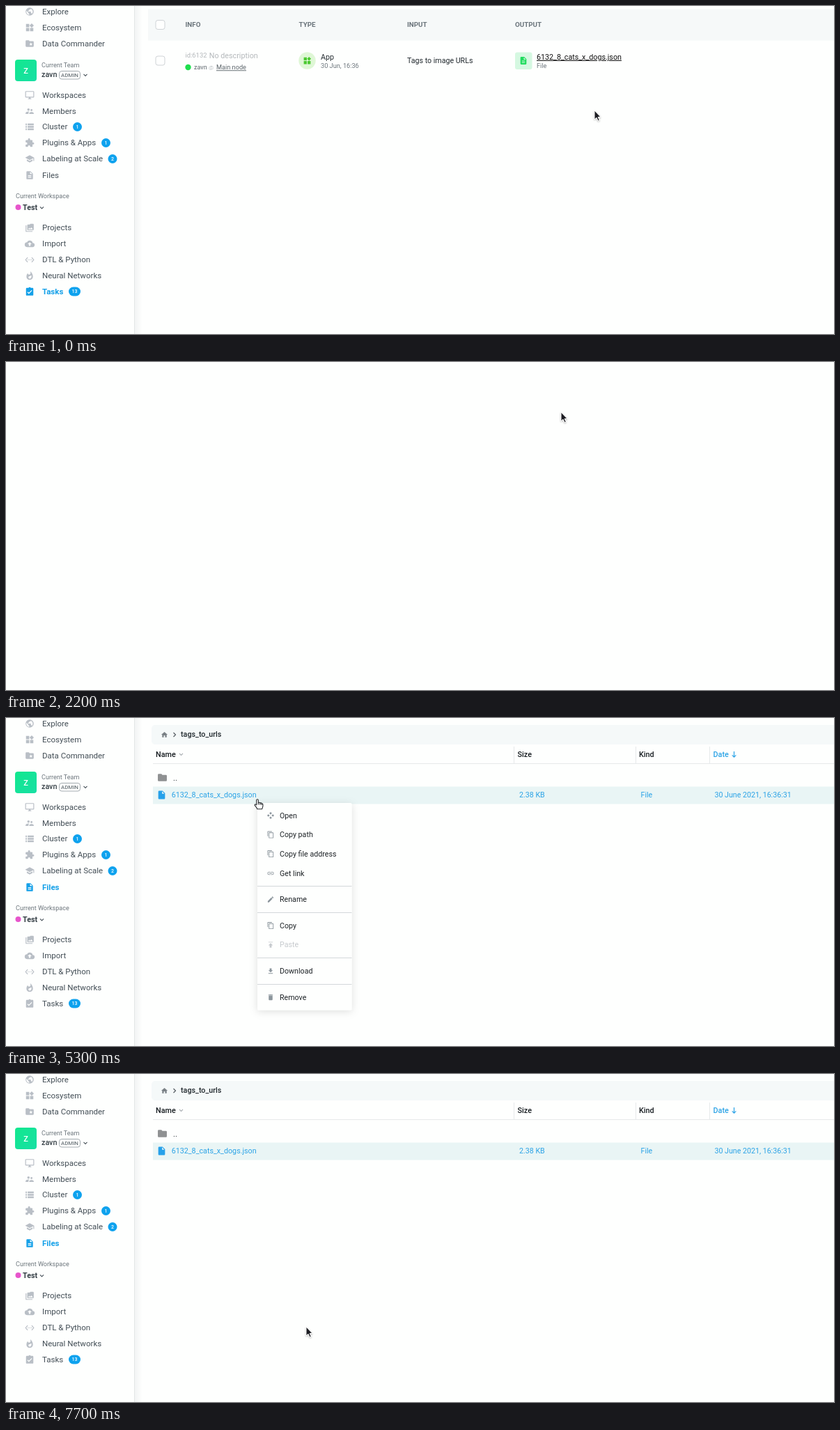
Recreate the animation shown at these times as an HTML page. Size 1189 by 471 pixels, loop 8900 ms.

```html
<!DOCTYPE html>
<html lang="en">
<head>
<meta charset="utf-8">
<title>Finding a task output file</title>
<style>
html, body { margin: 0; width: 100%; height: 100%; overflow: hidden; background: #fefffe; }
svg { display: block; width: 100vw; height: 100vh; font-family: Roboto, sans-serif; }
.item text { fill: #434e56; }
.item .icon { fill: #b9bfc6; }
.item.on text { fill: #14a0e8; font-weight: 700; }
.item.on .icon { fill: #14a0e8; }
.item .badge text { fill: #fff; font-weight: 500; }
.row { fill: #5d6872; }
.row .name { fill: #10181d; }
.row.picked, .row.picked .name { fill: #2ba3e6; }
.entry .icon { fill: #8b959c; }
.entry text { fill: #1d2226; }
.entry.off text, .entry.off .icon { fill: #c6cace; }
.entry .back { fill: none; }
.entry.on .back { fill: #e2e6ef; }
.entry.on .icon { fill: #23282d; }
</style>
</head>
<body>
<svg id="stage" viewBox="0 0 1189 471" preserveAspectRatio="none"></svg>
<script>
const LOOP = 8900, STEP = 100;

const ICONS = {
  globe: 'M12 2a10 10 0 1 0 0 20 10 10 0 0 0 0-20zM11 20a8 8 0 0 1-7-10l5 5v1l2 2zM18 17l-2-1h-1v-4H8v-2h2l1-3h2l2-2a8 8 0 0 1 3 12z',
  widgets: 'M3 3h8v8H3zM3 13h8v8H3zM13 13h8v8h-8zM17 1.7 22.3 7 17 12.3 11.7 7z',
  starFolder: 'M10 4H4a2 2 0 0 0-2 2v12a2 2 0 0 0 2 2h16a2 2 0 0 0 2-2V8a2 2 0 0 0-2-2h-8zM15 9l1.2 3H19l-2.2 2 .8 3-2.6-1.6-2.6 1.6.8-3-2.2-2h2.8z',
  folder: 'M10 4H4a2 2 0 0 0-2 2v12a2 2 0 0 0 2 2h16a2 2 0 0 0 2-2V8a2 2 0 0 0-2-2h-8z',
  screen: 'M21 2H3a2 2 0 0 0-2 2v12a2 2 0 0 0 2 2h7v2H8v2h8v-2h-2v-2h7a2 2 0 0 0 2-2V4a2 2 0 0 0-2-2zM21 16H3V4h18z',
  people: 'M16.5 7a2.5 2.5 0 1 0 0 5 2.5 2.5 0 0 0 0-5zM9 5a3 3 0 1 0 0 6 3 3 0 0 0 0-6zM16.5 14c-1.8 0-5.5.9-5.5 2.7V19h11v-2.3c0-1.8-3.7-2.7-5.5-2.7zM9 13c-2.3 0-7 1.2-7 3.5V19h7v-2.3c0-.8.3-2.3 2.4-3.4z',
  list: 'M2 4h3v4H2zM7 4h15v4H7zM2 10h3v4H2zM7 10h15v4H7zM2 16h3v4H2zM7 16h15v4H7z',
  puzzle: 'M20.5 11H19V7a2 2 0 0 0-2-2h-4V3.5a2.5 2.5 0 0 0-5 0V5H4a2 2 0 0 0-2 2v3.8h1.5a2.7 2.7 0 0 1 0 5.4H2V20a2 2 0 0 0 2 2h3.8v-1.5a2.7 2.7 0 0 1 5.4 0V22H17a2 2 0 0 0 2-2v-4h1.5a2.5 2.5 0 0 0 0-5z',
  school: 'M5 13.2v4L12 21l7-3.8v-4L12 17zM12 3 1 9l11 6 9-4.9V17h2V9z',
  doc: 'M14 2H6a2 2 0 0 0-2 2v16a2 2 0 0 0 2 2h12a2 2 0 0 0 2-2V8zM16 18H8v-2h8zM16 14H8v-2h8zM13 9V3.5L18.5 9z',
  file: 'M14 2H6a2 2 0 0 0-2 2v16a2 2 0 0 0 2 2h12a2 2 0 0 0 2-2V8zM13 9V3.5L18.5 9z',
  photos: 'M22 16V4a2 2 0 0 0-2-2h-6l-2 2H8a2 2 0 0 0-2 2v10a2 2 0 0 0 2 2h12a2 2 0 0 0 2-2zM8 16l3-4 2 2.7 3-3.7 4 5zM2 6v14a2 2 0 0 0 2 2h15v-2H4V6z',
  cloud: 'M19.4 10A7.5 7.5 0 0 0 5.4 8 6 6 0 0 0 6 20h13a5 5 0 0 0 .4-10zM14 13v4h-4v-4H7l5-5 5 5z',
  arrows: 'M7.8 6.8 6.2 5.5.8 12l5.4 6.5 1.6-1.3L3.4 12zM7 11h2v2H7zM11 11h2v2h-2zM15 11h2v2h-2zM17.8 5.5l-1.6 1.3 4.4 5.2-4.4 5.2 1.6 1.3 5.4-6.5z',
  flame: 'M13.5.7s.7 2.6.7 4.8a3.5 3.5 0 0 1-7 0v-.4A14 14 0 0 0 4 14a8 8 0 0 0 16 0C20 8.600 17.400 3.800 13.500.7zM11.700 19a3.200 3.200 0 0 1-.4-6.300c1.800-.4 3.600-1.200 4.600-2.500 1.700 5.300-1.100 8.800-4.200 8.800z',
  task: 'M19 3h-4.200a3 3 0 0 0-5.600 0H5a2 2 0 0 0-2 2v15a2 2 0 0 0 2 2h14a2 2 0 0 0 2-2V5a2 2 0 0 0-2-2zM10 18l-4-4 1.400-1.400 2.600 2.600 6.600-6.600L18 10z',
  home: 'M10 20v-6h4v6h5v-8h3L12 3 2 12h3v8z',
  move: 'M12 1l4 4-4 4-4-4zM12 15l4 4-4 4-4-4zM5 8l4 4-4 4-4-4zM19 8l4 4-4 4-4-4z',
  copy: 'M16 1H4a2 2 0 0 0-2 2v14h2V3h12zM19 5H8a2 2 0 0 0-2 2v14a2 2 0 0 0 2 2h11a2 2 0 0 0 2-2V7a2 2 0 0 0-2-2zM19 21H8V7h11z',
  link: 'M3.900 12A3.100 3.100 0 0 1 7 8.900h4V7H7a5 5 0 0 0 0 10h4v-1.900H7A3.100 3.100 0 0 1 3.900 12zM8 11h8v2H8zM17 7h-4v1.900h4a3.100 3.100 0 0 1 0 6.200h-4V17h4a5 5 0 0 0 0-10z',
  pencil: 'M3 17.200V21h3.800L17.800 9.900l-3.700-3.700zM20.700 7a1 1 0 0 0 0-1.400l-2.300-2.300a1 1 0 0 0-1.400 0l-1.900 1.800 3.800 3.800z',
  paste: 'M5 3v2h14V3zM5 14h4v7h6v-7h4l-7-7z',
  download: 'M19 9h-4V3H9v6H5l7 7zM5 18v2h14v-2z',
  bin: 'M6 19a2 2 0 0 0 2 2h8a2 2 0 0 0 2-2V7H6zM19 4h-3.500l-1-1h-5l-1 1H5v2h14z'
};

const icon = (name, x, y, size, fill = '') =>
  `<path class="icon" d="${ICONS[name]}" fill-rule="evenodd" ${fill && `fill="${fill}"`}
    transform="translate(${x - size / 2} ${y - size / 2}) scale(${size / 24})"/>`;
// y is the middle of the capital letters
const text = (s, x, y, size, attrs = '') =>
  `<text x="${x}" y="${y + size * 0.355}" font-size="${size}" ${attrs}>${s}</text>`;
const rect = (x, y, w, h, fill, attrs = '') =>
  `<rect x="${x}" y="${y}" width="${w}" height="${h}" fill="${fill}" ${attrs}/>`;
const line = (d, color, w = 1) =>
  `<path d="${d}" fill="none" stroke="${color}" stroke-width="${w}"/>`;
const caret = (x, y, color) => line(`M${x - 2.500} ${y - 1.200}l2.500 2.500 2.500-2.500`, color, 1.200);
const group = (id, body) => `<g id="${id}">${body}</g>`;
const medium = 'font-weight="500"', bold = 'font-weight="700"', middle = 'text-anchor="middle"';

// label, icon, y, badge text, badge x
const NAV = [
  ['Explore', 'globe', 7.500], ['Ecosystem', 'widgets', 30.500], ['Data Commander', 'starFolder', 53.500],
  ['Workspaces', 'screen', 127.500], ['Members', 'people', 150.500], ['Cluster', 'list', 173, 1, 102.500],
  ['Plugins &amp; Apps', 'puzzle', 196, 1, 143.500], ['Labeling at Scale', 'school', 219, 2, 153],
  ['Files', 'doc', 242.500], ['Projects', 'photos', 318], ['Import', 'cloud', 341],
  ['DTL &amp; Python', 'arrows', 364], ['Neural Networks', 'flame', 387], ['Tasks', 'task', 409.500, 13, 98.500]
];

const badge = (n, x, y) => {
  const w = n > 9 ? 17 : 13;
  return `<g class="badge">${rect(x - w / 2, y - 6, w, 13, '#0ea2ee', 'rx="6.500"')}
    ${text(n, x, y + 0.500, 7, middle)}</g>`;
};

const sidebar =
  rect(185, 0, 11, 471, 'url(#edge)') + line('M184.500 0V471', '#e3e6e6') +
  NAV.map(([label, pic, y, n, x]) => `<g class="item" id="nav${label.slice(0, 4)}">
    ${icon(pic, 34, y + 0.500, 14)}${text(label, 52, y, 11.500)}${n ? badge(n, x, y) : ''}</g>`).join('') +
  rect(13, 77, 31, 31, 'url(#avatar)', 'rx="4"') +
  text('Z', 28.500, 93, 11, `${middle} ${medium} fill="#fff"`) +
  text('Current Team', 51, 85, 9.050, 'fill="#6c757c"') +
  text('zavn', 51, 98.500, 10.700, `${medium} fill="#343e45"`) +
  rect(76.500, 93.500, 30, 11.500, 'none', 'rx="3.500" stroke="#9aa2a8" stroke-width=".9"') +
  text('ADMIN', 91.500, 99.500, 7.900, `${middle} fill="#4c565d"`) +
  caret(114, 99, '#4c565d') +
  text('Current Workspace', 14, 273, 9.050, 'fill="#6c757c"') +
  '<circle cx="17.500" cy="289" r="4" fill="#e755cb"/>' +
  text('Test', 24, 289, 10.700, `${bold} fill="#343e45"`) + caret(51.500, 289.500, '#4c565d');

const checkbox = y => rect(215, y, 13, 13, '#fefffe', 'rx="3" stroke="#cfd3d6"');
const FILE = '6132_8_cats_x_dogs.json';

const tasks =
  rect(204, 4.500, 985, 45, '#f6f9f9') +
  rect(204, 49.500, 985, 59.500, '#f9fbfb', 'id="taskHover"') +
  checkbox(20.500) + checkbox(72) +
  [['INFO', 257.500], ['TYPE', 420.500], ['INPUT', 576], ['OUTPUT', 731]]
    .map(([s, x]) => text(s, x, 27, 9.800, `${bold} fill="#6b757c"`)).join('') +
  text('id:6132', 257.500, 70.500, 9.400, 'fill="#b4b8bb"') +
  text('No description', 291.800, 71, 10.750, 'fill="#b4b8bb"') +
  '<circle cx="261.500" cy="88" r="4.200" fill="#1fdf4e"/>' +
  text('zavn', 270, 88, 9, 'fill="#5d666c"') +
  text('@', 291, 88, 8, 'fill="#c3c7ca"') +
  text('Main node', 302, 88, 9.200, 'fill="#5d666c" text-decoration="underline"') +
  '<circle cx="432.500" cy="78.500" r="12.200" fill="#dff7d6"/>' + icon('widgets', 432.500, 78.500, 13, '#4cc932') +
  text('App', 452, 73, 10.700, 'fill="#20282d"') +
  text('30 Jun, 16:36', 452, 86, 9.200, 'fill="#6c757c"') +
  text('Tags to image URLs', 576, 78, 10.650, 'fill="#20282d"') +
  rect(731, 66.500, 24.500, 24.500, '#d5f8e1', 'rx="3"') + icon('doc', 743, 78.500, 13, '#1fdc5d') +
  text(FILE, 762, 73, 10.730, 'fill="#111" text-decoration="underline"') +
  text('File', 762, 86, 9.200, 'fill="#6c757c"');

const filesHead =
  rect(209, 10, 990, 28, '#f5f9f9', 'rx="5"') +
  icon('home', 227.500, 24, 11, '#7a8186') +
  line('M240.500 21l3 3-3 3', '#555d62', 1.200) +
  text('tags_to_urls', 251, 23.500, 10.750, `${medium} fill="#20282d"`) +
  [['Name', 215], ['Size', 734.500], ['Kind', 909]]
    .map(([s, x]) => text(s, x, 52, 10.800, `${medium} fill="#171d21"`)).join('') +
  text('Date', 1015.500, 52, 10.800, `${medium} fill="#2ba3e6"`) +
  caret(251.500, 52, '#a8aeb2') +
  line('M1045.500 48v8M1042.700 53.300l2.800 2.800 2.800-2.800', '#2ba3e6', 1.200) +
  line('M729.500 41V65M904.500 41V65M1010.500 41V65M211 65.500H1189', '#e6e9ea');

const filesRows =
  rect(211, 73.500, 978, 24.500, '#f4f9f9', 'id="upHover"') +
  rect(211, 98.500, 978, 25, '#e9f5f5') +
  icon('folder', 224.500, 85.500, 15.500, '#8f9192') + text('..', 240, 86, 11, 'fill="#20282d"') +
  icon('file', 223.500, 110.500, 14.500, '#26a1ea') +
  `<g class="row" id="fileRow">${text(FILE, 237.700, 110.500, 10.730, 'class="name"')}
    ${text('2.38 KB', 737, 110.500, 10.650)}${text('File', 911.500, 110.500, 10.650)}
    ${text('30 June 2021, 16:36:31', 1017.500, 110.500, 10.650)}</g>`;

const MENU = [
  ['Open', 'move', 140], ['Copy path', 'copy', 167.500], ['Copy file address', 'copy', 195], ['Get link', 'link', 223],
  ['Rename', 'pencil', 260.500], ['Copy', 'copy', 298], ['Paste', 'paste', 325.500],
  ['Download', 'download', 363.500], ['Remove', 'bin', 401]
];
const menu =
  rect(361, 122, 135.500, 297.500, '#fefffe', 'rx="2" filter="url(#lift)"') +
  MENU.map(([s, pic, y]) => `<g class="entry ${s === 'Paste' ? 'off' : ''}">
    <rect class="back" x="361" y="${y - 14}" width="135.500" height="28"/>
    ${icon(pic, 380, y, 11)}${text(s, 393, y, 10.670)}</g>`).join('') +
  line('M361 241.500h135.500M361 279.500h135.500M361 344.500h135.500M361 382.500h135.500', '#d3d7da');

const arrow = `<path d="M0 0V13L3 10.300 5.200 15 7.300 14.100 5.200 9.500H9Z"
  fill="#1c1e20" stroke="#fff" stroke-width="1" filter="url(#soft)"/>`;
const hand = `<path transform="translate(1 -.5)" d="M-1.300 8.500V1.500C-1.300-.2 1.300-.2 1.300 1.500V5.600C1.500 4.500 3.700 4.500 3.800 5.900
  4.200 5 6 5.200 6.100 6.600 6.600 6 8 6.300 7.900 7.800V10.200L6.700 14.200H-.4L-.8 12.600-3.800 8.900C-4.300 7.500-2.700 6.800-1.300 8.500Z
  M1.300 5.600V8M3.800 5.900V8.300M6.100 6.600V8.600" fill="#fff" stroke="#26292c" stroke-width="1.100" stroke-linejoin="round"/>`;

document.getElementById('stage').innerHTML = `<defs>
  <linearGradient id="edge"><stop stop-color="#f2f4f4"/><stop offset="1" stop-color="#fefffe"/></linearGradient>
  <linearGradient id="avatar" x2="1" y2="1"><stop stop-color="#12e88e"/><stop offset="1" stop-color="#18dfa4"/></linearGradient>
  <filter id="lift" x="-20%" y="-20%" width="140%" height="140%">
    <feDropShadow dx="0" dy="2" stdDeviation="6" flood-opacity=".13"/></filter>
  <filter id="soft" x="-50%" y="-50%" width="200%" height="200%">
    <feDropShadow dx="0" dy="1" stdDeviation=".8" flood-opacity=".3"/></filter></defs>` +
  rect(0, 0, 1189, 471, '#fefffe') +
  group('sidebar', sidebar) + group('tasks', tasks) +
  group('filesHead', filesHead) + group('filesRows', filesRows) + group('menu', menu) +
  group('dark', rect(0, 0, 1189, 471, '#333838') + rect(0, 469, 1189, 2, '#2d3232')) +
  group('cursor', group('arrow', arrow) + group('hand', hand));

// time, x, y of the pointer hotspot
const PATH = [
  [0, 845, 150], [800, 845, 150], [900, 836, 133], [1000, 836, 133], [1200, 822, 108], [1400, 803, 80],
  [1600, 797, 72], [3800, 797, 72], [3900, 789, 72], [4000, 755, 80], [4100, 690, 92], [4200, 633, 101.500],
  [4300, 633, 101.500], [4600, 520, 112], [4800, 405, 115], [5000, 360, 117], [5900, 360, 117],
  [6000, 368, 130], [6200, 394, 176.500], [6300, 405, 215], [6400, 413, 255], [6600, 424, 325],
  [6800, 429, 361.500], [6900, 431, 363], [LOOP, 431, 363]
];

function pointer(t) {
  const i = PATH.findIndex(p => p[0] > t);
  const [t0, x0, y0] = PATH[i - 1], [t1, x1, y1] = PATH[i];
  const k = (t - t0) / (t1 - t0);
  return { x: x0 + (x1 - x0) * k, y: y0 + (y1 - y0) * k };
}

const el = id => document.getElementById(id);
const show = (id, on) => { el(id).style.display = on ? '' : 'none'; };
const entries = [...document.querySelectorAll('.entry')];

function draw(t) {
  const { x, y } = pointer(t);
  const onTasks = t < 2100, menuOpen = t >= 5300 && t < 7400;
  show('sidebar', onTasks || t >= 2800);
  show('tasks', onTasks);
  show('taskHover', onTasks && y < 109);
  show('dark', t >= 2100 && t < 2200);
  show('filesHead', t >= 3200);
  show('filesRows', t >= 3500);
  show('upHover', t >= 3700 && y < 98);
  show('menu', menuOpen);
  el('navTask').classList.toggle('on', onTasks);
  el('navFile').classList.toggle('on', !onTasks);
  el('fileRow').classList.toggle('picked', t >= 5300);

  // the highlight runs one step ahead of the drawn pointer
  const ahead = pointer(Math.min(t + STEP, LOOP - 1)).y;
  entries.forEach((e, i) => e.classList.toggle('on', menuOpen && Math.abs(ahead - MENU[i][2]) < 13.900));

  const overLink = (onTasks && y < 81) || (t >= 3700 && t < 7400);
  show('hand', overLink);
  show('arrow', !overLink);
  el('cursor').setAttribute('transform', `translate(${x} ${y})`);
}

const start = performance.now();
function tick() {
  const t = (performance.now() - start) % LOOP;
  draw(Math.floor(t / STEP) * STEP);
  requestAnimationFrame(tick);
}
tick();
</script>
</body>
</html>
```
